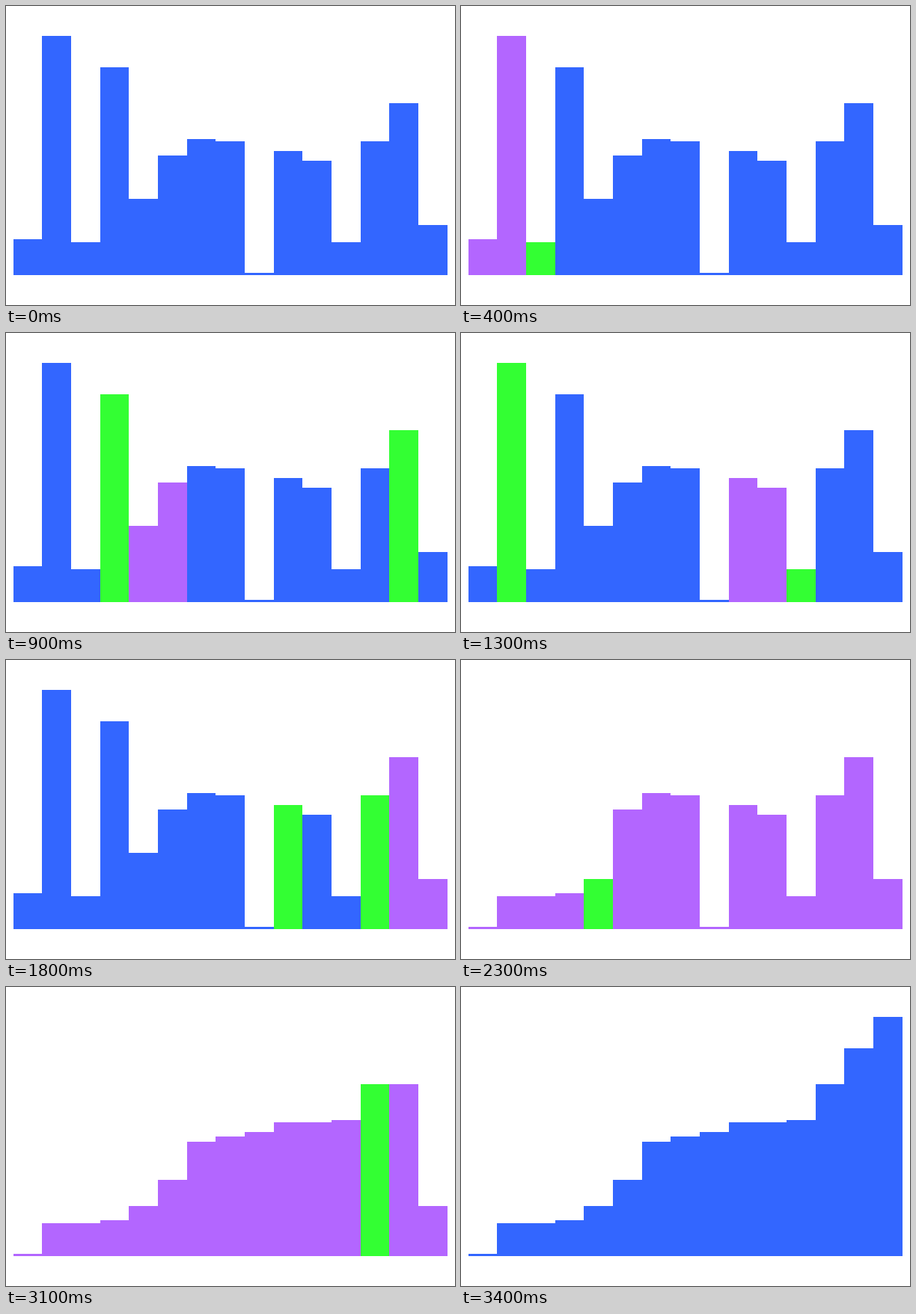
An HTML page with a canvas for the animation above (3.5 s loop, 600 by 400 pixels).

```html
<!DOCTYPE html>
<html lang="en">
<head>
<meta charset="utf-8">
<title>Counting sort in blocks</title>
<style>
  html, body { margin: 0; width: 100%; height: 100%; overflow: hidden; background: #fff; }
  canvas { display: block; width: 600px; height: 400px; }
</style>
</head>
<body>
<canvas id="stage" width="600" height="400"></canvas>
<script>
const ctx = document.getElementById('stage').getContext('2d');
const IDLE = '#3366ff', ACTIVE = '#b366ff', TOUCHED = '#33ff33';
const STEP = 100, STEPS = 35, BLOCK = 3, BASE = 360;
const SCATTER = 4, WRITE = 19, DONE = 34;

const values = [48, 320, 44, 278, 102, 160, 182, 179, 3, 166, 153, 44, 179, 230, 67];
const n = values.length;
const sorted = [...values].sort((a, b) => a - b);
const edge = i => Math.floor(10 + i * 580 / n);

// Each block is scattered from its last item to its first; equal values fill downwards.
const moves = [];
const used = {};
for (let k = 0; k < n; k++) {
  const block = Math.floor(k / BLOCK);
  const from = block * BLOCK + BLOCK - 1 - k % BLOCK;
  const v = values[from];
  used[v] = (used[v] || 0) + 1;
  moves.push({ block, from, to: sorted.lastIndexOf(v) + 1 - used[v] });
}

function colour(i, step) {
  if (step === 0 || step === DONE) return IDLE;
  if (step < SCATTER) return ACTIVE;
  if (step >= WRITE) return i === step - WRITE ? TOUCHED : ACTIVE;
  const { block, from, to } = moves[step - SCATTER];
  if (i === from || i === to) return TOUCHED;
  return Math.floor(i / BLOCK) === block ? ACTIVE : IDLE;
}

function draw(step) {
  ctx.fillStyle = '#fff';
  ctx.fillRect(0, 0, 600, 400);
  for (let i = 0; i < n; i++) {
    const h = i <= step - WRITE ? sorted[i] : values[i];
    ctx.fillStyle = colour(i, step);
    ctx.fillRect(edge(i), BASE - h, edge(i + 1) - edge(i), h);
  }
}

const start = performance.now();
function tick() {
  draw(Math.floor((performance.now() - start) / STEP) % STEPS);
  requestAnimationFrame(tick);
}
tick();
</script>
</body>
</html>
```
